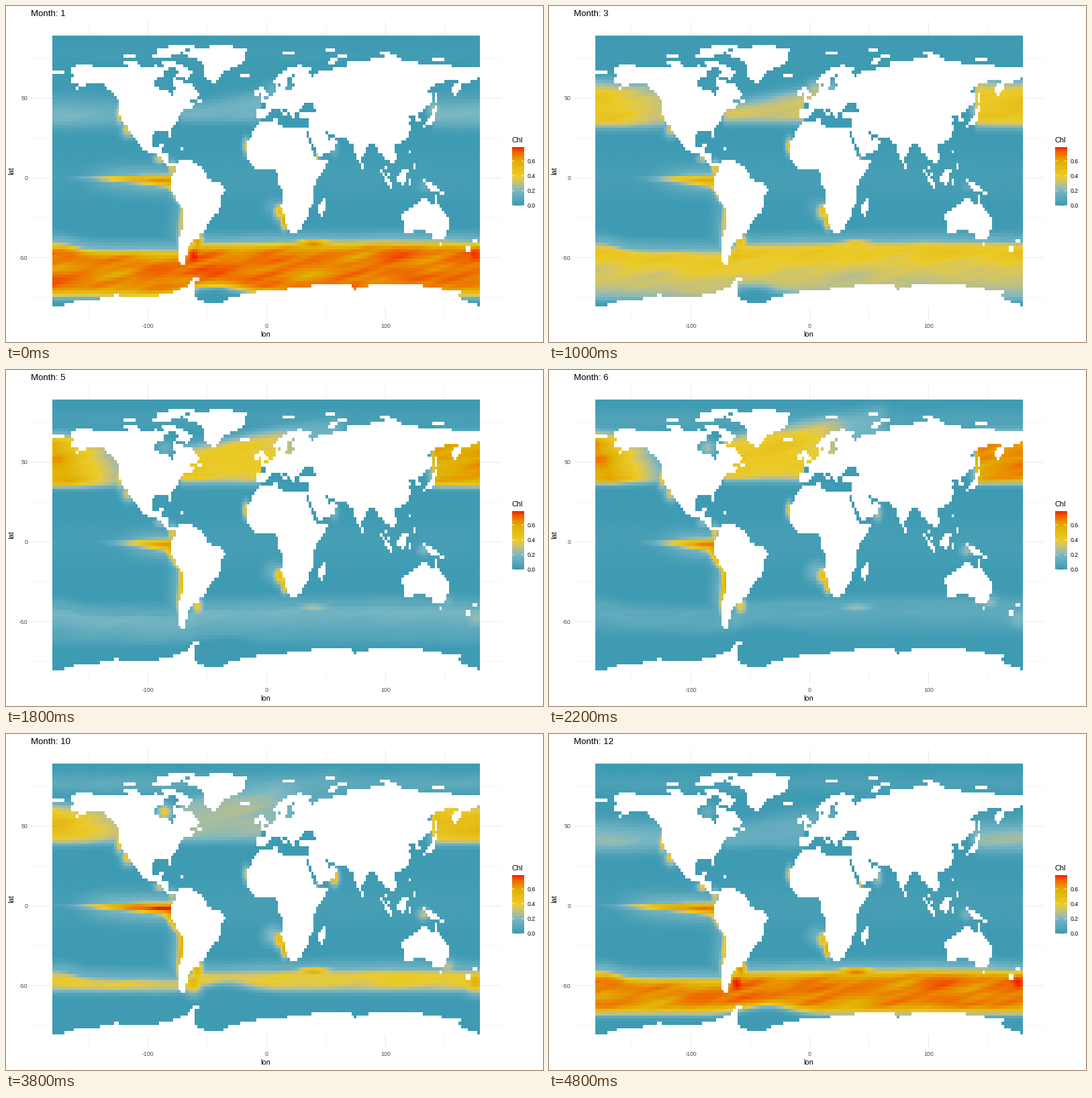
Animation of 800 by 500 pixels, one loop 5000 ms. Source, as a matplotlib script:

```python
import numpy as np
import matplotlib.pyplot as plt
from matplotlib.animation import FuncAnimation
from matplotlib.colors import ListedColormap, to_rgb
from matplotlib.path import Path

FRAMES, INTERVAL = 25, 200
VMAX = 0.78
RNG = np.random.default_rng(4)

# 2-degree grid
LON, LAT = np.meshgrid(np.arange(-179.5, 180, 2), np.arange(88.5, -80, -2))
LON360 = LON % 360


def px(lon):
    return 388.5 + 1.769 * lon


def py(lat):
    return 255.8 - 2.37 * lat


# ---- land outlines, key points as (lon, lat) -----------------------------
NORTH_AMERICA = [
    (-168, 66), (-162, 67), (-166, 69), (-156, 71.5), (-141, 70), (-125, 70.3),
    (-115, 69), (-96, 69), (-94, 72), (-90, 69.3), (-82, 69.5), (-82, 67),
    (-86, 66.5), (-87, 64.5), (-93, 62), (-94.5, 59), (-92.5, 57), (-82, 55),
    (-82, 53), (-79, 51.3), (-79, 54.5), (-76.5, 57), (-78, 59), (-77.5, 62.5),
    (-70, 61), (-69.5, 59), (-64.5, 60), (-57.5, 54.5), (-56, 52), (-60, 50),
    (-66, 49.5), (-124, 49), (-130, 54), (-135, 57.5), (-141, 60), (-150, 60),
    (-155, 57.5), (-163, 54.5), (-158, 58.5), (-164, 60), (-165, 63),
    (-161, 64.3)]
MIDDLE_AMERICA = [
    (-124, 49.5), (-124, 40), (-120.5, 34.5), (-117, 32.5), (-112, 25),
    (-109.5, 23.5), (-105.5, 20), (-104, 17), (-95, 15.7), (-87.5, 12.5),
    (-84, 8.5), (-80, 7.3), (-77, 7.5), (-77, 9), (-83, 10.5), (-83, 15.5),
    (-88, 16), (-87, 21.7), (-90.5, 21), (-91, 18.5), (-95, 18.7), (-97.5, 22),
    (-97.5, 26), (-95, 29), (-84, 30), (-82.5, 28), (-81, 25), (-80, 27),
    (-81, 31), (-76, 35), (-74, 40), (-70, 42), (-70, 44), (-64, 44),
    (-60, 46), (-65, 48), (-65, 50)]
SOUTH_AMERICA = [
    (-77.5, 8), (-75, 11), (-72, 12), (-62, 10.5), (-52, 5), (-50, 0),
    (-44, -2.5), (-38, -3.5), (-35, -6), (-35, -9), (-39, -13), (-39, -18),
    (-41, -22), (-46, -24), (-50, -30), (-53.5, -34), (-57, -36), (-57, -38),
    (-62, -39), (-65, -42.5), (-67.5, -46), (-66, -48), (-69, -50.5),
    (-67, -55.5), (-71, -55.5), (-74.5, -52), (-73.5, -37), (-71.5, -33),
    (-70, -20), (-76, -14), (-81, -5), (-80, -2.5), (-80, 1), (-77.5, 4)]
GREENLAND = [
    (-73, 78), (-60, 82), (-48, 82.5), (-47, 83.6), (-30, 83.6), (-29, 82.5),
    (-17, 82), (-18, 75), (-22, 71), (-32, 68), (-38, 65.5), (-43, 59.5),
    (-49, 61), (-53, 66), (-52, 69.5), (-57, 74), (-65, 76)]
ELLESMERE = [(-90, 76.5), (-78, 76.5), (-70, 80), (-61, 82.5), (-70, 83.4),
             (-80, 83), (-90, 81.5), (-94, 80)]
BAFFIN = [(-62, 66), (-66, 62), (-72, 63), (-78, 65), (-73, 68), (-85, 70),
          (-89, 73.7), (-80, 73.8), (-73, 71.5), (-67, 69.3)]
AFRICA = [
    (-6, 35.7), (-10, 31), (-15.5, 23), (-15.5, 12), (-12, 7.5), (-8, 5),
    (-2, 5), (4, 6.5), (9, 4.2), (9, -1), (13.5, -9), (13.5, -13), (12, -17),
    (14.5, -23), (18, -33), (20, -34.5), (25, -34), (28, -32.5), (35, -24),
    (35, -20), (40, -15.5), (40.5, -10.5), (39, -6), (42, -1.5), (47, 4),
    (51, 10.5), (51, 12), (44.5, 10.5), (39, 15.5), (37, 20), (33, 28),
    (35, 29), (35, 32), (32, 31.3), (20, 32), (19, 30.5), (10.5, 34), (10, 37),
    (0, 36)]
EUROPE = [
    (-6, 36.5), (-9, 37), (-9, 43.5), (-1.5, 43.5), (-1.5, 46.5), (-4.5, 48.5),
    (3, 51.5), (8, 54), (8, 57), (10.5, 57.5), (11, 54.5), (20, 54.5),
    (24, 59.3), (29, 59.8), (22.5, 60.3), (21.5, 63), (25, 65.3), (22, 65.5),
    (17.5, 62), (18.5, 59.5), (16, 56.5), (12.5, 56), (11, 59), (7, 58),
    (5, 61), (15, 68), (27, 71), (41, 67.5), (41, 66.5), (35, 66.5), (37, 64),
    (44, 66), (46, 68.3), (46, 36), (36, 36.5), (27, 37), (26.5, 40.5),
    (23, 40.5), (24, 38), (22.5, 36.5), (19, 42), (12.5, 45.5), (14, 42.5),
    (18, 40), (16, 38), (9, 44), (4, 43.3), (0, 39), (-2, 36.8)]
SIBERIA = [
    (45, 42), (44, 68), (67, 69), (67, 72.5), (80, 73), (104, 77.5), (112, 76),
    (113, 74), (127, 73), (130, 71), (140, 72.5), (160, 70), (181, 69),
    (181, 63.5), (170, 60), (164, 59.5), (162, 55), (157, 51), (156, 57),
    (163, 61.5), (156, 61.5), (142, 59), (135, 55), (140, 53), (140, 48),
    (130, 42)]
SOUTH_ASIA = [
    (45, 43), (130, 43), (127.5, 39.5), (129.5, 36), (126.5, 34.5), (125, 39.5),
    (118, 39), (122, 37), (119.5, 35), (122, 31), (117, 23.5), (106, 20),
    (109, 14), (109, 11.5), (105, 9), (101, 13), (99.5, 10), (104, 1.3),
    (101, 3), (98, 15), (94.5, 16), (91, 22.5), (87, 21.5), (80, 13.5),
    (77.5, 8), (72.5, 21), (67, 24.5), (57, 26.5), (48.5, 30), (52, 24),
    (56, 25), (59.5, 22.5), (57, 18.5), (52, 16), (43, 13), (42.5, 16),
    (35, 28), (36, 37)]
AUSTRALIA = [
    (114, -22), (115.5, -34), (118, -35), (124, -33.5), (131, -31.5),
    (135.5, -34.8), (138, -33.5), (140, -37.5), (146, -39), (150, -37.5),
    (153, -31), (153, -26), (146, -19), (142.5, -11), (141, -16), (138.5, -17),
    (135.5, -14.5), (136.5, -12), (131, -11.5), (128.5, -15), (122, -18)]
ANTARCTICA = [
    (-181, -82), (-181, -80), (-170, -79.5), (-160, -77), (-146, -76.5),
    (-126, -73), (-122, -74.5), (-104, -74.5), (-84, -73), (-66, -67),
    (-61, -62.6), (-57, -62.6), (-57, -64.6), (-61, -66), (-61, -75),
    (-50, -78), (-38, -78), (-32, -75), (-5, -71), (12, -71), (18, -69),
    (48, -66.8), (71, -67), (74, -70), (85, -67.5), (122, -66.3), (163, -71.5),
    (160, -74), (168, -77), (181, -80.5), (181, -82)]
ISLANDS = [
    [(44, -16), (49, -12), (50.5, -16), (47, -25.5), (44, -23)],
    [(52, 71), (57, 71), (59, 75), (68, 76.5), (60, 77), (53, 74)],
    [(-5, 50), (1.5, 51), (1.5, 53), (-2, 56), (-2, 58.5), (-6, 58)],
    [(130, 31), (140, 35), (144, 45), (141, 45), (140, 40), (136, 36.5)],
    [(95, 5.5), (98, 4.5), (106, -3), (105, -6), (101, -3)],
    [(109, 2), (111, 1.5), (116, 6.5), (119, 5), (116, -4), (110, -3)],
    [(131, -1), (138, -2), (150, -10.5), (138, -8), (135, -4)],
    [(-125, 72), (-115, 73), (-108, 73), (-104, 69), (-115, 70)]]
# west, south, east, north
BLOCKS = [
    (-23, 63.5, -14, 66), (14, 77, 24, 79.5), (49, 80, 57, 81),
    (95, 78, 104, 80.5), (139, 74, 150, 75.5), (-10, 52, -6, 55),
    (-72, 18, -70, 20), (79.6, 6, 82, 9), (120, 15, 122, 18), (124, 6, 126, 9),
    (120, -4, 122, 0), (145, -43, 148, -41), (168, -46, 172, -43),
    (173, -41, 177, -38), (-58, 47, -54, 50), (141, 47, 144, 53),
    (-181, 65, -171, 67.6), (-121, 75, -111, 76.6), (-97, 75, -80, 76.8)]
BLACK_SEA = [(28, 41.5), (28, 44), (31, 46.5), (39, 47), (41.5, 42), (31, 41.2)]


def inside(outline):
    points = np.column_stack([LON.ravel(), LAT.ravel()])
    return Path(outline).contains_points(points).reshape(LON.shape)


land = np.zeros(LON.shape, bool)
for outline in [NORTH_AMERICA, MIDDLE_AMERICA, SOUTH_AMERICA, GREENLAND,
                ELLESMERE, BAFFIN, AFRICA, EUROPE, SIBERIA, SOUTH_ASIA,
                AUSTRALIA, ANTARCTICA] + ISLANDS:
    land |= inside(outline)
for west, south, east, north in BLOCKS:
    land |= (LON > west) & (LON < east) & (LAT > south) & (LAT < north)
land &= ~inside(BLACK_SEA)

# ---- seasonal chlorophyll ------------------------------------------------
# local blooms: lon, lat, width, height, mean, swing, peak month
BLOOMS = [
    (-79.5, 6, 2.5, 3.5, .40, .08, 3.5),    # Panama
    (-90, 12, 4, 2.2, .30, .08, 12),        # Central America
    (-124, 40, 3, 5, .42, .05, 9),          # California
    (-117, 31, 4, 4, .38, .04, 10),
    (-86, 59, 5, 4, .18, .22, 8.5),         # Hudson Bay
    (-58, -40, 4, 4, .53, .14, 11.8),       # Patagonia
    (-62, -48, 6, 5, .44, .31, 12.2),
    (-17.5, 20, 2, 4, .42, .07, 4.5),       # West Africa
    (11, -21, 4, 4, .47, .03, 8),           # Namibia
    (15, -27, 2.5, 4, .56, .05, 11.5),
    (5, -18, 6, 5, .16, .08, 8.5),
    (40, -41, 12, 2, .47, .22, 12),         # Agulhas
    (57, 18, 3, 4, .25, .24, 9),            # Arabian Sea
    (42.5, 13.5, 1.2, 2, .22, .20, 12.5),
    (132, -5, 4, 3, .20, .11, 8.5),         # Indonesia
    (141, 43, 4, 4, .27, .07, 3.5),         # Japan
    (152, -38, 6, 4, .17, .12, 8.5),        # Tasman Sea
    (176, -48, 8, 5, .44, .25, 12),         # New Zealand
    (5, 56, 6, 4, .20, .15, 5)]             # North Sea


def cycle(month, peak):
    return np.cos(2 * np.pi * (month - peak) / 12)


def wave(month, peak):
    return (1 + cycle(month, peak)) / 2


def step(x, width=1.0):
    return 1 / (1 + np.exp(-x / width))


def hill(x, width):
    return np.exp(-(x / width) ** 2 / 2)


def swirl_noise(waves=14):
    total = 0
    for _ in range(waves):
        kx, ky = RNG.normal(0, .12), RNG.normal(0, .5)
        total = total + np.sin(kx * LON + ky * LAT + RNG.uniform(0, 2 * np.pi))
    return total / np.sqrt(waves / 2)


SWIRL = swirl_noise()


def southern_band(m):
    summer = wave(m, 12.6)
    core = .13 + .55 * summer ** .8
    pacific = step(LON + 162, 5) * step(-64 - LON, 2)
    front = -41 + np.cos(np.radians(LON - 90)) - 4 * pacific
    edge = -52 - 26 * wave(m, 2.4) ** 1.3 + 5 * hill(LON + 35, 18)
    depth = np.clip((front - LAT) / 27, 0, 1.2)
    fade = np.exp(-2 * (1 - summer) ** 1.5 * depth)
    band = core * fade * step(front - LAT, 1.5) * step(LAT - edge, 1.5)
    haze = (.10 + .08 * summer) * hill(LAT - front - 1, 4)
    ice = np.exp(-((LON + 48) / 15) ** 4 - ((LAT + 74) / 6) ** 4)
    return np.maximum(band, haze) * (1 - .85 * ice)


def north_pacific(m):
    summer = wave(m, 6.8)
    south = 36.5 + 4 * cycle(m, 8.8)
    north = 46 + 25 * summer ** .6
    soft = 3 - 2 * summer ** .5
    east = np.clip((LON360 - 190 + .6 * (LAT - 45)) / 45, 0, 1)
    amp = (.25 + .4 * summer ** .7) * (1 - (.25 + .5 * summer ** 2) * east)
    gate = step(LON360 - 139, .8) * step(239 - LON360)
    arctic = 1 - .4 * step(LAT - 66)
    return (amp * gate * arctic * step(LAT - south, soft)
            * step(north - LAT, soft + 1))


def north_atlantic(m):
    amp = (.13 + .29 * wave(m, 5.8) ** .7) * (1 - .6 * step(LON - 20, 8))
    south = 38 + 3.5 * cycle(m, 8.5)
    north = 62 + 15 * cycle(m, 8) + .15 * (LON + 40)
    gate = step(LON + 73, .8) * step(65 - LON, 3)
    gate = gate * ~((LON > -4) & (LAT < 47))
    return amp * gate * step(LAT - south, 1.6) * step(north - LAT, 2.2)


def equator_tongue(m):
    reach = -134 - 18 * cycle(m, 11)
    amp = (.66 + .09 * cycle(m, 8.8)) * step(LON - reach, 11) * (LON < -77)
    east = np.clip((LON + 170) / 90, 0, 1)
    y = LAT + 1.8 * east ** 2
    return amp * np.maximum(hill(y, 1.3 + 2 * east ** 2), .33 * hill(y, 6.5))


def andes_coast(m):
    winter = wave(m, 8)
    shore = np.interp(LAT, [-50, -18, -6, 0], [-75, -71, -81, -81])
    off = shore - LON
    amp = (.30 + .28 * winter) * step(LAT + 44, 3) * step(3 - LAT)
    width = 2.2 + 2.8 * winter * hill(LAT + 8, 10)
    return amp * np.maximum(hill(off, width), .33 * hill(off, 7)) * (off > -5)


def chlorophyll(m):
    layers = [southern_band(m), north_pacific(m), north_atlantic(m),
              equator_tongue(m), andes_coast(m),
              (.055 + .055 * cycle(m, 8.7)) * hill(LAT - 77, 5)]
    layers += [(mean + swing * cycle(m, peak)) * hill(LON - x, w)
               * hill(LAT - y, h) for x, y, w, h, mean, swing, peak in BLOOMS]
    total = sum(layer ** 6 for layer in layers) ** (1 / 6)
    calm = .012 + .02 * hill(LAT, 9)
    return np.ma.array(np.maximum(total, calm) * (1 + .045 * SWIRL), mask=land)


# ---- colour ramp blended in Lab ------------------------------------------
TO_XYZ = np.array([[.4124, .3576, .1805], [.2126, .7152, .0722],
                   [.0193, .1192, .9505]])
WHITE = TO_XYZ.sum(axis=1)
TO_LAB = np.array([[0, 116, 0], [500, -500, 0], [0, 200, -200]])


def lab_ramp(colors, n=256):
    rgb = np.array([to_rgb(c) for c in colors])
    lin = np.where(rgb > .04045, ((rgb + .055) / 1.055) ** 2.4, rgb / 12.92)
    lab = np.cbrt(lin @ TO_XYZ.T / WHITE) @ TO_LAB.T
    at = np.linspace(0, len(colors) - 1, n)
    lab = np.column_stack([np.interp(at, range(len(colors)), c) for c in lab.T])
    xyz = (lab @ np.linalg.inv(TO_LAB).T) ** 3 * WHITE
    lin = np.clip(xyz @ np.linalg.inv(TO_XYZ).T, 0, 1)
    rgb = np.where(lin > .0031308, 1.055 * lin ** (1 / 2.4) - .055, 12.92 * lin)
    return ListedColormap(np.clip(rgb, 0, 1))


cmap = lab_ramp(["#3B9AB2", "#78B7C5", "#EBCC2A", "#E1AF00", "#F21A00"])
cmap.set_bad("white")

# ---- stage ---------------------------------------------------------------
plt.rcParams["font.family"] = "Liberation Sans"
fig = plt.figure(figsize=(8, 5), dpi=100, facecolor="white")
ax = fig.add_axes([0, 0, 1, 1])
ax.axis("off")

PANEL_X, PANEL_Y = [px(-198.5), px(197.5)], [py(98), py(-89)]
GREY = "#4D4D4D"


def label(x, y, text, size, color="black", **kw):
    return ax.text(x, y, text, fontsize=size * .72, color=color, **kw)


def line(xs, ys, color, width):
    ax.plot(xs, ys, color=color, lw=width * .72, zorder=1,
            solid_capstyle="butt", snap=False)


for i in range(-3, 4):
    width = .53 if i % 2 else 1.07
    line([px(50 * i)] * 2, PANEL_Y, "#EBEBEB", width)
    line(PANEL_X, [py(25 * i)] * 2, "#EBEBEB", width)
    if i % 2 == 0:
        label(px(50 * i), 479, str(50 * i), 8.8, GREY, ha="center")
        label(32, py(25 * i) + 3.2, str(25 * i), 8.8, GREY, ha="right")

sea = ax.imshow(chlorophyll(1), cmap=cmap, vmin=0, vmax=VMAX, aspect="auto",
                interpolation="nearest", zorder=2, extent=(69, 706, 447, 44))

label(387, 492, "lon", 11, ha="center")
label(13.5, 245, "lat", 11, ha="right", va="center", rotation=90)
title = label(37, 15, "", 13.2)

# legend
BAR_X0, BAR_X1, BAR_TOP, BAR_BOTTOM = 754, 771.3, 210.6, 297
label(BAR_X0, 203, "Chl", 11)
ax.imshow(np.linspace(VMAX, 0, 256)[:, None], cmap=cmap, vmin=0, vmax=VMAX,
          aspect="auto", extent=(BAR_X0, BAR_X1, BAR_BOTTOM, BAR_TOP))
for v in (0, .2, .4, .6):
    y = BAR_BOTTOM - v / VMAX * (BAR_BOTTOM - BAR_TOP)
    label(777, y + 3.2, f"{v:.1f}", 8.8)
    for x in (BAR_X0, BAR_X1 - 3.5):
        line([x, x + 3.5], [y, y], "white", .77)

ax.set_xlim(0, 800)
ax.set_ylim(500, 0)


def draw(frame):
    month = 1 + frame * 11 / (FRAMES - 1)
    title.set_text(f"Month: {round(month)}")
    sea.set_data(chlorophyll(month))
    return sea, title


anim = FuncAnimation(fig, draw, frames=FRAMES, interval=INTERVAL, repeat=True)
plt.show()
```
